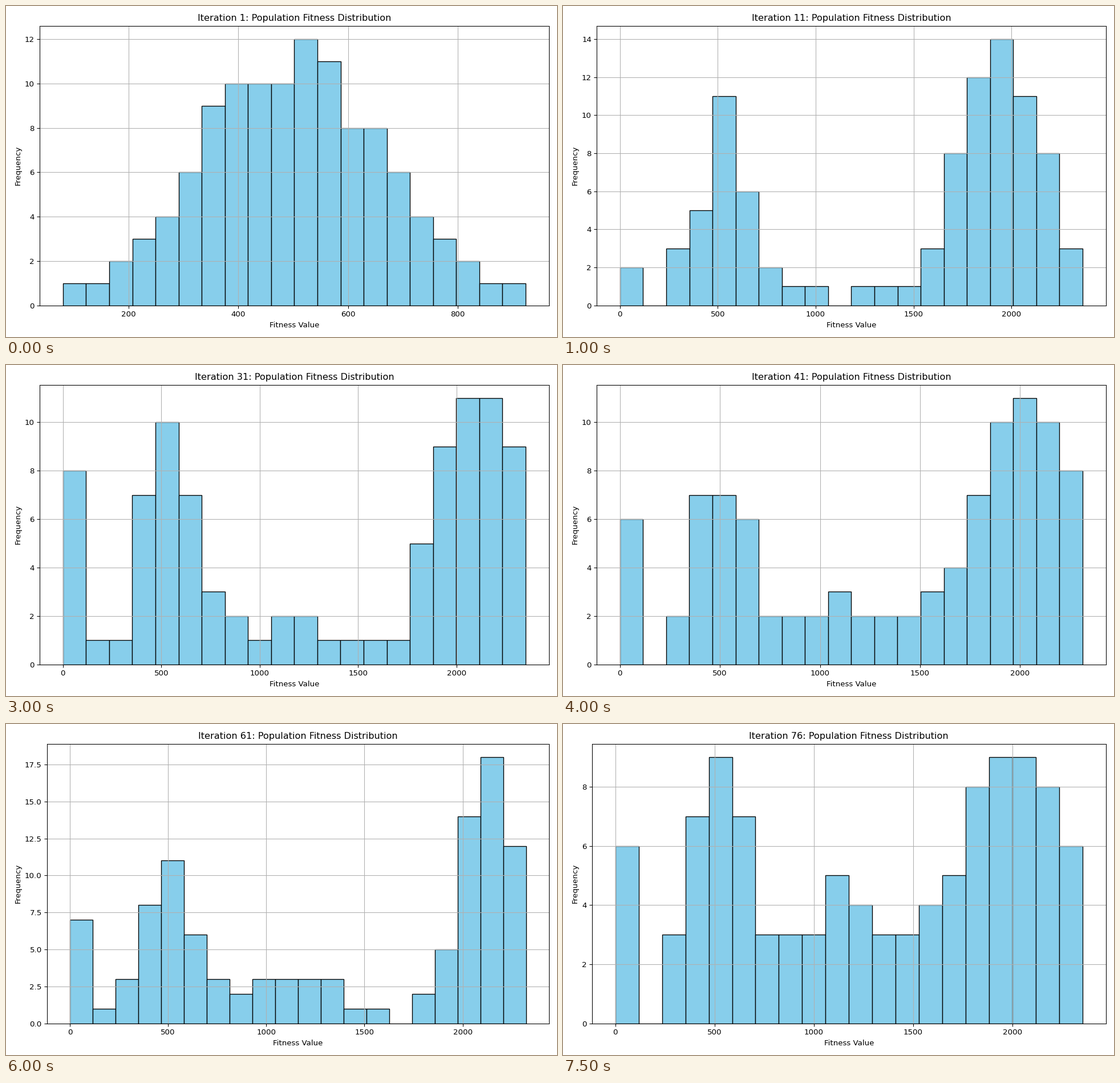
Write a matplotlib script that moves like this. It is 966x580 px and loops after 8 s.

```python
import numpy as np
import matplotlib.pyplot as plt
from matplotlib.animation import FuncAnimation

STEPS, INTERVAL, BINS = 16, 500, 20

# Key points of the fittest group: step, best value, peak count, centre, spread
KEYS = np.array([
    (0, 923.7, 12, 515, 165),
    (2, 2363.5, 14, 1950, 210),
    (4, 2402.5, 18, 2180, 125),
    (5, 2370, 11, 2150, 170),
    (8, 2312, 11, 2050, 260),
    (10, 2419, 11, 2060, 260),
    (12, 2322, 18, 2140, 135),
    (13, 2415, 14, 2100, 180),
    (15, 2353, 9, 2040, 270),
])


def bell(x, height, centre, spread):
    return height * np.exp(-0.5 * ((x - centre) / spread) ** 2)


def population(step):
    """Bin edges and counts of the fitness values at a step."""
    best, peak, centre, spread = (
        np.interp(step, KEYS[:, 0], column) for column in KEYS.T[1:])
    peak = int(peak)
    edges = np.linspace(max(0.5, 80.5 * (1 - step)), best, BINS + 1)
    x = (edges[:-1] + edges[1:]) / 2

    # The fittest, the laggards and a slowly filling middle
    crowd = bell(x, peak, centre, spread)
    crowd += bell(x, min(4.5 * step, 9), 510, 140)
    crowd += bell(x, 0.25 * step, 1150, 300)
    crowd[0] += np.interp(step, [1, 4], [0, 7])

    rng = np.random.default_rng(step)
    noisy = crowd + rng.normal(0, 0.3, BINS) * np.sqrt(crowd)
    counts = np.clip(np.rint(noisy), 0, peak)
    counts[crowd.argmax()] = peak
    return edges, counts


fig, ax = plt.subplots(figsize=(10, 6.0042), dpi=96.6)


def draw(step):
    ax.clear()
    edges, counts = population(step)
    ax.hist(edges[:-1], edges, weights=counts,
            color="skyblue", edgecolor="black")
    ax.set_title(f"Iteration {5 * step + 1}: Population Fitness Distribution")
    ax.set_xlabel("Fitness Value")
    ax.set_ylabel("Frequency")
    ax.grid(True)
    # The second pass settles the margin around overhanging tick labels
    fig.tight_layout()
    fig.tight_layout()
    return []


anim = FuncAnimation(fig, draw, frames=STEPS, interval=INTERVAL,
                     init_func=lambda: [], repeat=True, repeat_delay=0)
plt.show()
```
